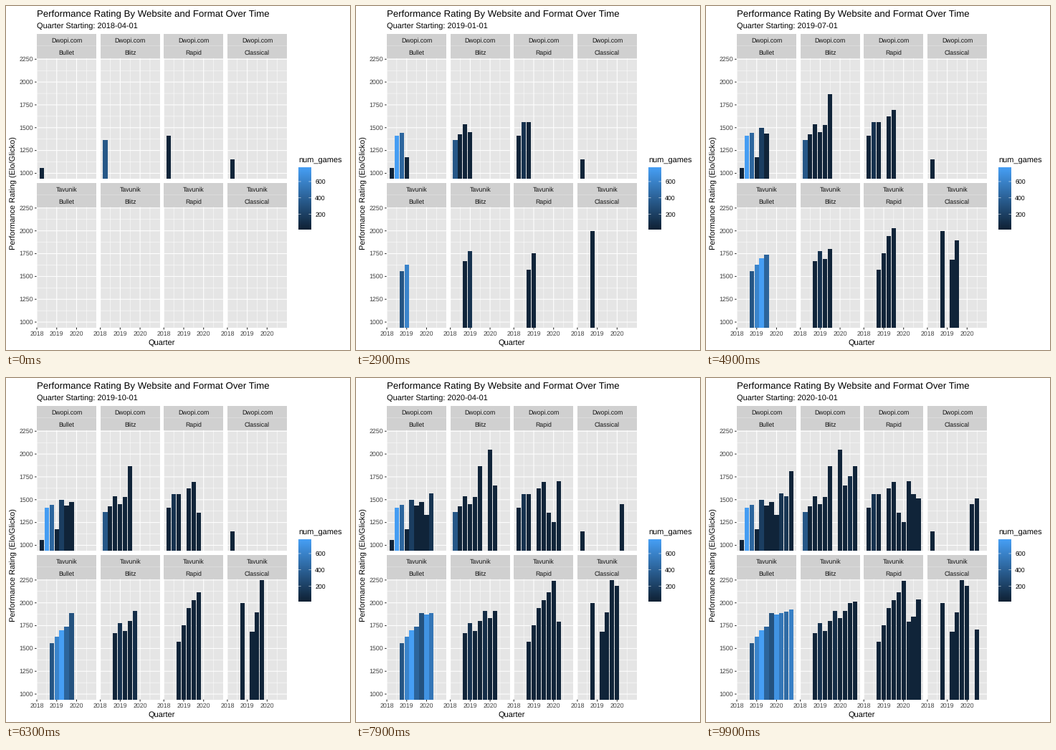
Write a matplotlib script that moves like this. It is 480x480 px and loops after 10000 ms.

```python
import math

import numpy as np
import matplotlib.pyplot as plt
from matplotlib.animation import FuncAnimation
from matplotlib.patches import Rectangle

plt.rcParams["font.family"] = ["Liberation Sans", "DejaVu Sans"]
plt.rcParams["text.hinting"] = "no_hinting"

SIZE, DPI = 480, 72  # one point equals one pixel
FRAMES, INTERVAL = 100, 100

SITES = ["Dwopi.com", "Tavunik"]
FORMATS = ["Bullet", "Blitz", "Rapid", "Classical"]

MONTHS = np.datetime64("2018-04") + 3 * np.arange(11)
DATES = MONTHS.astype("datetime64[D]")
DAYS = (DATES - np.datetime64("2018-01-01")).astype(int)

# Runs of key ratings by quarter; quarters between two keys are interpolated
RATINGS = {
    (0, 0): [{0: 1060, 1: 1410, 2: 1440, 3: 1175, 4: 1498, 5: 1435,
              6: 1473, 7: 1330, 8: 1567, 9: 1540, 10: 1810}],
    (0, 1): [{0: 1362, 1: 1425, 2: 1535, 3: 1450, 4: 1528, 5: 1865},
             {7: 2045, 8: 1655, 10: 1865}],
    (0, 2): [{0: 1410, 1: 1560, 2: 1560},
             {4: 1623, 5: 1692, 6: 1355, 7: 1252, 8: 1700, 9: 1560, 10: 1512}],
    (0, 3): [{0: 1150}, {8: 1450, 9: 1512}],
    (1, 0): [{2: 1555, 4: 1697, 5: 1735, 6: 1885, 7: 1870, 10: 1925}],
    (1, 1): [{2: 1670, 3: 1775, 4: 1690, 6: 1915, 7: 1830, 8: 1908,
              9: 2000, 10: 2010}],
    (1, 2): [{2: 1570, 4: 1940, 6: 2112, 7: 2238, 8: 1790, 9: 1845, 10: 2035}],
    (1, 3): [{2: 2000}, {4: 1680, 5: 1893, 6: 2248, 7: 2183}, {9: 1705}],
}

# Quarters with many games; all others have only a few
FEW = 35
BUSY = {
    (0, 0): {1: 765, 2: 430, 4: 190, 8: 130, 9: 140},
    (0, 1): {0: 340, 9: 90},
    (0, 2): {1: 120},
    (1, 0): {2: 330, 3: 610, 4: 770, 5: 420, 6: 310, 7: 700, 8: 530,
             9: 460, 10: 590},
    (1, 1): {3: 120, 6: 90},
}

# Layout in pixels, y pointing down
LEFT, PANEL_W, GAP = 43.0, 83.125, 5.5
TOP, PANEL_H, STRIP_H = 39.0, 168.1, 17.0
LOW, HIGH = 940, 2260
DAY0, DAY_SPAN = -0.25, 1094.5
BAR_DAYS = 81

DARK = np.array([14, 32, 51]) / 255
LIGHT = np.array([70, 159, 245]) / 255
STRIP, SEAM, PANEL = "#d0d0d0", "#dbdbdb", "#e5e5e5"
AXIS_TEXT, STRIP_TEXT, TICK = "#404040", "#141414", "#292929"
THICK, THIN = 1.07, 0.53


def strip_top(row):
    return TOP + row * (2 * STRIP_H + PANEL_H + GAP)


def panel_top(row):
    return strip_top(row) + 2 * STRIP_H


def panel_left(col):
    return LEFT + col * (PANEL_W + GAP)


def x_pos(col, day):
    return panel_left(col) + (day - DAY0) / DAY_SPAN * PANEL_W


def y_pos(row, rating):
    return panel_top(row) + (HIGH - rating) / (HIGH - LOW) * PANEL_H


def shade(games):
    t = min(max((games - 10) / 765, 0), 1)
    return DARK + (LIGHT - DARK) * t


def lookup(key, k):
    """Rating and colour of one quarter, or None where no bar exists."""
    for run in RATINGS[key]:
        if min(run) <= k <= max(run):
            rating = np.interp(k, list(run), list(run.values()))
            return rating, shade(BUSY.get(key, {}).get(k, FEW))
    return None


fig = plt.figure(figsize=(SIZE / DPI, SIZE / DPI), dpi=DPI, facecolor="white")
ax = fig.add_axes([0, 0, 1, 1])
ax.axis("off")


def box(x, y, w, h, color, z=1):
    """A filled rectangle with its edges on whole pixels."""
    patch = Rectangle((x, y), w, h, facecolor=color, linewidth=0, zorder=z)
    patch.set_snap(True)
    return ax.add_patch(patch)


def line(xs, ys, color, width, z=2):
    ax.plot(xs, ys, color=color, lw=width, zorder=z, snap=False,
            solid_capstyle="butt")


def label(x, y, text, size, color="black", ha="left", **kw):
    return ax.text(x, round(y), text, fontsize=size, color=color, ha=ha,
                   va="baseline", zorder=6, **kw)


def draw_panel(row, col):
    x0, y0 = panel_left(col), panel_top(row)
    x1, y1 = x0 + PANEL_W, y0 + PANEL_H
    for i, text in enumerate([SITES[row], FORMATS[col]]):
        top = strip_top(row) + i * STRIP_H
        box(x0, top, PANEL_W, STRIP_H, STRIP)
        label(x0 + PANEL_W / 2, top + 12.2, text, 8.8, STRIP_TEXT, "center")
    box(x0, strip_top(row) + STRIP_H - 0.8, PANEL_W, 1, SEAM, 2)
    box(x0, y0, PANEL_W, PANEL_H, PANEL)

    for rating in range(1000, 2251, 125):
        y = y_pos(row, rating)
        major = rating % 250 == 0
        line([x0, x1], [y, y], "white", THICK if major else THIN)
        if major and col == 0:
            line([x0 - 2.75, x0], [y, y], TICK, THICK)
            label(x0 - 4.95, y + 2.8, str(rating), 8.8, AXIS_TEXT, "right")

    for half in range(6):
        x = x_pos(col, half * 182.5)
        major = half % 2 == 0
        line([x, x], [y0, y1], "white", THICK if major else THIN)
        if major and row == 1:
            line([x, x], [y1, y1 + 2.75], TICK, THICK)
            label(x, y1 + 11.3, str(2018 + half // 2), 8.8, AXIS_TEXT, "center")


def draw_legend(x=408, y=225, w=18, h=87):
    label(x, 219, "num_games", 11)
    rows = 87
    for i in range(rows):
        t = (i + 0.5) / rows
        box(x, y + i * h / rows, w, h / rows, LIGHT + (DARK - LIGHT) * t, 2)
    for games in (200, 400, 600):
        ty = y + h - (games - 12) / 763 * h
        line([x, x + w / 5], [ty, ty], "white", THIN, 3)
        line([x + w * 0.8, x + w], [ty, ty], "white", THIN, 3)
        label(x + w + 5.2, ty + 3.1, str(games), 8.8)


for r in range(len(SITES)):
    for c in range(len(FORMATS)):
        draw_panel(r, c)
draw_legend()
ax.set_xlim(0, SIZE)
ax.set_ylim(SIZE, 0)

label(LEFT, 15, "Performance Rating By Website and Format Over Time", 13.2)
subtitle = label(LEFT, 32, "", 11)
label(217.5, 473, "Quarter", 11, ha="center")
label(14, 261, "Performance Rating (Elo/Glicko)", 11, ha="center",
      rotation=90, rotation_mode="anchor")


def place(bar, key, day, rating, color, alpha=1.0):
    row, col = key
    bar.set_visible(rating > LOW)
    base, top = y_pos(row, LOW), y_pos(row, max(rating, LOW))
    bar.set_bounds(x_pos(col, day - BAR_DAYS / 2), top,
                   BAR_DAYS / DAY_SPAN * PANEL_W, base - top)
    bar.set_facecolor(color)
    bar.set_alpha(alpha)


settled = []  # (quarter, patch)
movers = {}
for key in RATINGS:
    for k, day in enumerate(DAYS):
        found = lookup(key, k)
        if found:
            patch = box(0, 0, 1, 1, "black", 4)
            place(patch, key, day, *found)
            settled.append((k, patch))
    movers[key] = box(0, 0, 1, 1, "black", 5)


def span(k):
    """Frames that quarter k holds, and then takes to move on."""
    return 4 if k >= 6 and k % 2 == 0 else 5


def phase(frame):
    """Current quarter, progress to the next one, and the quarter to name."""
    k = 0
    while frame >= 2 * span(k):
        frame -= 2 * span(k)
        k += 1
    step = frame - span(k) + 1
    if step <= 0:
        return k, 0.0, k
    return k, step / span(k), k + (step > math.ceil(span(k) / 2))


def update(frame):
    k, p, named = phase(frame)
    subtitle.set_text(f"Quarter Starting: {DATES[named]}")
    for q, patch in settled:
        patch.set_visible(q <= k)
    for key, bar in movers.items():
        old, new = lookup(key, k), lookup(key, k + 1)
        if p == 0 or new is None:
            bar.set_visible(False)
        elif old is None:
            place(bar, key, DAYS[k + 1], new[0] * p, new[1], p)
        else:
            day, rating, color = (
                a + (b - a) * p
                for a, b in zip((DAYS[k], *old), (DAYS[k + 1], *new)))
            place(bar, key, day, rating, color)
    return [subtitle, *movers.values()]


anim = FuncAnimation(fig, update, frames=FRAMES, interval=INTERVAL,
                     repeat=True, repeat_delay=0, blit=False)
plt.show()
```
